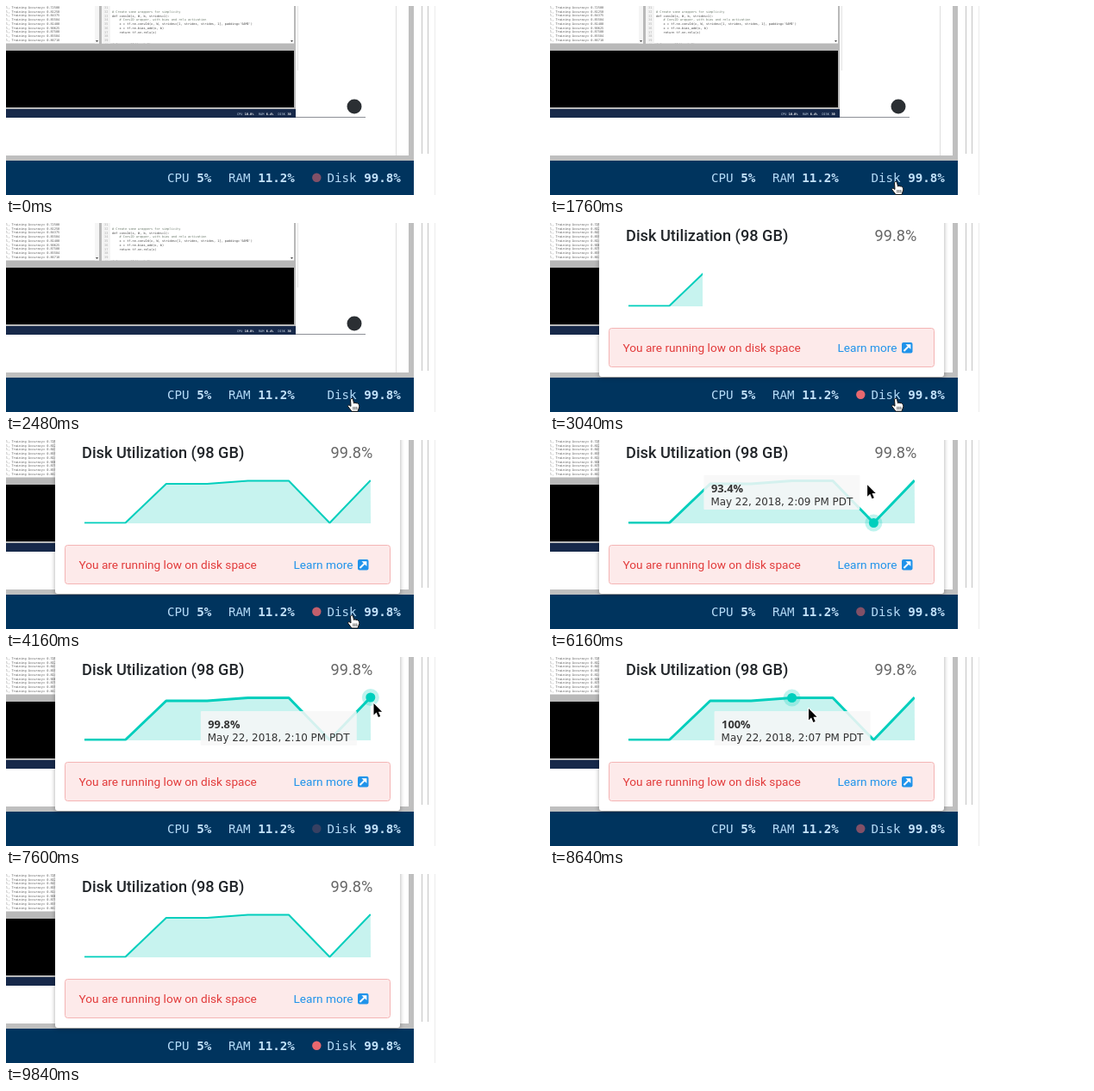
An HTML page with a canvas for the animation above (9920 ms loop, 624 by 220 pixels).

```html
<!DOCTYPE html>
<html lang="en">
<head>
<meta charset="utf-8">
<title>Disk utilization</title>
<style>
html, body { margin: 0; width: 100%; height: 100%; overflow: hidden; background: #fff; }
canvas { display: block; }
</style>
</head>
<body>
<canvas id="stage" width="624" height="220"></canvas>
<script>
const ctx = document.getElementById('stage').getContext('2d');
const LOOP = 9920, STEP = 80, POPUP_AT = 2640, CHART_AT = 2700;
const MONO = '"DejaVu Sans Mono", monospace';
const ROBOTO = 'Roboto, sans-serif';
const TEAL = '#00cfbd';

const accuracies = ['0.72500', '0.81250', '0.84375', '0.85584', '0.81400',
  '0.90625', '0.87500', '0.85584', '0.86718'];
const codeLines = [
  '',
  '# Create some wrappers for simplicity',
  'def conv2d(x, W, b, strides=1):',
  '    # Conv2D wrapper, with bias and relu activation',
  "    x = tf.nn.conv2d(x, W, strides=[1, strides, strides, 1], padding='SAME')",
  '    x = tf.nn.bias_add(x, b)',
  '    return tf.nn.relu(x)',
  '', '',
  'def maxpool2d(x, k=2):'
];

// Plot points; readings are one minute apart, ending at 2:10.
const levels = [96.5, 96.5, 51, 51, 47.5, 47.5, 96.5, 47];
const values = ['93.4%', '93.4%', '99.5%', '99.5%', '100%', '100%', '93.4%', '99.8%'];
const points = levels.map((y, i) => ({ x: 91 + i * 47.4, y }));

// Pointer path: time, x, y
const path = [
  [800, 422, -4], [1600, 401, 204], [4240, 401, 203.5], [5200, 327.5, 51],
  [5720, 327.5, 51], [6720, 426.5, 54], [7640, 426.5, 54], [8640, 300, 60],
  [9360, 300, 60], [9760, 290, -22]
];

function rect(x, y, w, h, color) {
  ctx.fillStyle = color;
  ctx.fillRect(x, y, w, h);
}

function text(str, x, y, font, color) {
  ctx.font = font;
  ctx.fillStyle = color;
  ctx.fillText(str, x, y);
}

function circle(x, y, r, color) {
  ctx.fillStyle = color;
  ctx.beginPath();
  ctx.arc(x, y, r, 0, Math.PI * 2);
  ctx.fill();
}

function roundBox(x, y, w, h, r, fill, stroke) {
  ctx.beginPath();
  ctx.roundRect(x, y, w, h, r);
  ctx.fillStyle = fill;
  ctx.fill();
  if (!stroke) return;
  ctx.strokeStyle = stroke;
  ctx.lineWidth = 1;
  ctx.stroke();
}

function clipped(x, y, w, h, draw) {
  ctx.save();
  ctx.beginPath();
  ctx.rect(x, y, w, h);
  ctx.clip();
  draw();
  ctx.restore();
}

function polygon(coords) {
  ctx.beginPath();
  for (let i = 0; i < coords.length; i += 2) ctx.lineTo(coords[i], coords[i + 1]);
  ctx.closePath();
}

function drawEditor() {
  const font = '3.57px ' + MONO;
  rect(0, 0, 336, 130, '#b9b9b9');
  rect(0, 0, 108, 43.5, '#fff');
  rect(111, 0, 223, 43.5, '#fff');
  rect(103, 0, 5, 43.5, '#f5f5f5');
  rect(111, 0, 10, 43.5, '#f4f4f4');
  clipped(0, 0, 334, 43.5, () => {
    accuracies.forEach((value, i) =>
      text('l, Training Accuracy= ' + value, 0, 3 + i * 4.7, font, '#555'));
    codeLines.forEach((line, i) => {
      const y = 3.3 + i * 4.7;
      text(31 + i, 114, y, font, '#aaa');
      text(line, 123, y, font, line.includes('#') ? '#6d7c6d' : '#444');
    });
  });
  for (const x of [105.5, 331.5]) {
    polygon([x - 1.5, 40, x + 1.5, 40, x, 42]);
    ctx.fillStyle = '#444';
    ctx.fill();
  }
  rect(0, 52, 334, 66, '#000');
  rect(0, 120, 336, 10, '#17294a');
  const tiny = ' 3.5px ' + MONO;
  [['CPU', '10.0%', 268], ['RAM', '6.4%', 293], ['DISK', '30', 315.5]].forEach(([label, value, x]) => {
    text(label, x, 126.5, tiny, '#c7d8ea');
    text(value, x + (label.length + 1) * 2.2, 126.5, 'bold' + tiny, '#fff');
  });
}

function drawPage() {
  rect(0, 0, 624, 220, '#fff');
  drawEditor();
  rect(338, 0, 1, 75, '#e4e4e4');
  rect(336, 129, 81, 1, '#8c8f96');
  circle(404, 117, 8.5, '#2b2f33');
  rect(452, 0, 1, 174, '#dedede');
  rect(467, 0, 6, 180, '#bfbfbf');
  rect(0, 174, 473, 6, '#bfbfbf');
  rect(482, 0, 1, 172, '#c4c4c4');
  rect(489, 0, 1, 172, '#c4c4c4');
  rect(497, 0, 1, 220, '#ececec');
}

function drawStatus(t) {
  rect(0, 180, 473, 40, '#00345e');
  const font = '14.2px ' + MONO;
  [['CPU ', '5%', 187], ['RAM ', '11.2%', 258], ['Disk ', '99.8%', 372.5]].forEach(([label, value, x]) => {
    text(label, x, 205, font, '#b5dbf8');
    text(value, x + ctx.measureText(label).width, 205, 'bold ' + font, '#c3e2fa');
  });
  const pulse = 0.4 + 0.62 * Math.cos((t - 200) / 960 * Math.PI * 2);
  ctx.globalAlpha = Math.min(1, Math.max(0, pulse));
  circle(360.3, 199.8, 5.2, '#e8686f');
  ctx.globalAlpha = 1;
}

function drawChart(t, hovered) {
  const progress = Math.min(1, Math.max(0, (t - CHART_AT) / 1000));
  const width = 332 * (1 - Math.cos(progress * Math.PI)) / 2;
  clipped(91, 46, width, 51.5, () => {
    ctx.beginPath();
    points.forEach(p => ctx.lineTo(p.x, p.y));
    ctx.strokeStyle = TEAL;
    ctx.lineWidth = hovered ? 3 : 2;
    ctx.lineJoin = 'round';
    ctx.stroke();
    ctx.lineTo(423, 97);
    ctx.lineTo(91, 97);
    ctx.fillStyle = 'rgba(0, 201, 183, 0.22)';
    ctx.fill();
  });
}

function drawTooltip(index) {
  const p = points[index];
  circle(p.x, p.y, 10, 'rgba(0, 207, 189, 0.25)');
  circle(p.x, p.y, 5.5, TEAL);
  const x = p.x > 340 ? p.x - 197 : Math.max(75, p.x - 90);
  const y = p.y > 80 ? 41 : 63;
  roundBox(x, y, 181, 40, 1, 'rgba(247, 247, 247, 0.86)');
  text(values[index], x + 8.5, y + 20, 'bold 12.8px "Noto Sans", sans-serif', '#333');
  const minute = String(3 + index).padStart(2, '0');
  text(`May 22, 2018, 2:${minute} PM PDT`, x + 8, y + 35, '11.95px "DejaVu Sans", sans-serif', '#333');
}

function drawLinkIcon() {
  roundBox(408, 139, 12.5, 12.5, 2, '#2093ea');
  ctx.strokeStyle = '#fff';
  ctx.lineWidth = 2;
  ctx.beginPath();
  ctx.moveTo(410.5, 149);
  ctx.lineTo(416, 143.5);
  ctx.stroke();
  polygon([412.5, 141.2, 418.4, 141.2, 418.4, 147.1]);
  ctx.fillStyle = '#fff';
  ctx.fill();
}

function drawPopup(t, hovered, index) {
  ctx.save();
  ctx.shadowColor = 'rgba(0, 0, 0, 0.35)';
  ctx.shadowBlur = 5;
  ctx.shadowOffsetY = 1;
  roundBox(57, -20, 400, 199, 3, '#fff');
  ctx.restore();
  text('Disk Utilization (98 GB)', 88, 21, '500 18.2px ' + ROBOTO, '#212529');
  text('99.8%', 376.5, 21, '18.2px ' + ROBOTO, '#666');
  roundBox(68.5, 122.5, 377, 45, 3, '#fdeaea', '#f4b4b4');
  text('You are running low on disk space', 84.5, 150, '13.65px ' + ROBOTO, '#e23b3b');
  text('Learn more', 333.5, 150, '13.65px ' + ROBOTO, '#2093ea');
  drawLinkIcon();
  drawChart(t, hovered);
  if (hovered) drawTooltip(index);
}

function pointerAt(t) {
  if (t < path[0][0] || t > path[path.length - 1][0]) return null;
  const i = Math.max(1, path.findIndex(k => k[0] >= t));
  const [t0, x0, y0] = path[i - 1], [t1, x1, y1] = path[i];
  const u = (t - t0) / (t1 - t0), e = u * u * (3 - 2 * u);
  return { x: x0 + (x1 - x0) * e, y: y0 + (y1 - y0) * e };
}

function drawPointer({ x, y }) {
  ctx.save();
  ctx.translate(x, y);
  ctx.lineJoin = 'round';
  if (y > 181) {
    // Pointing hand
    ctx.beginPath();
    ctx.moveTo(-1.5, 1.5);
    ctx.quadraticCurveTo(0, -1, 1.5, 1.5);
    ctx.lineTo(2.5, 6);
    ctx.quadraticCurveTo(4, 4.5, 5, 6);
    ctx.quadraticCurveTo(7, 5, 7.5, 7);
    ctx.quadraticCurveTo(9, 7, 8.8, 10);
    ctx.lineTo(7, 15.5);
    ctx.lineTo(0, 15.5);
    ctx.lineTo(-4.5, 9.5);
    ctx.quadraticCurveTo(-4, 7, -1, 9.5);
    ctx.closePath();
    ctx.fillStyle = '#fff';
    ctx.strokeStyle = '#111';
    ctx.lineWidth = 1;
    ctx.fill();
    ctx.stroke();
    for (const fx of [1.5, 3.5, 5.5]) rect(fx, 10, 0.8, 3.5, '#333');
  } else {
    polygon([0, 0, 0, 13.5, 3.1, 10.6, 5.4, 16, 7.7, 15, 5.4, 9.8, 9.6, 9.8]);
    ctx.strokeStyle = '#fff';
    ctx.lineWidth = 2;
    ctx.stroke();
    ctx.fillStyle = '#000';
    ctx.fill();
  }
  ctx.restore();
}

function draw(now) {
  const t = Math.floor(now % LOOP / STEP) * STEP;
  const pointer = pointerAt(t);
  const hovered = t > 4000 && pointer && pointer.y > 38 && pointer.y < 105;
  const index = hovered ? Math.min(7, Math.max(0, Math.round((pointer.x - 91) / 47.4))) : 0;
  drawPage();
  drawStatus(t);
  if (t >= POPUP_AT) drawPopup(t, hovered, index);
  if (pointer) drawPointer(pointer);
}

const start = performance.now();
function tick() {
  draw(performance.now() - start);
  requestAnimationFrame(tick);
}
tick();
</script>
</body>
</html>
```
